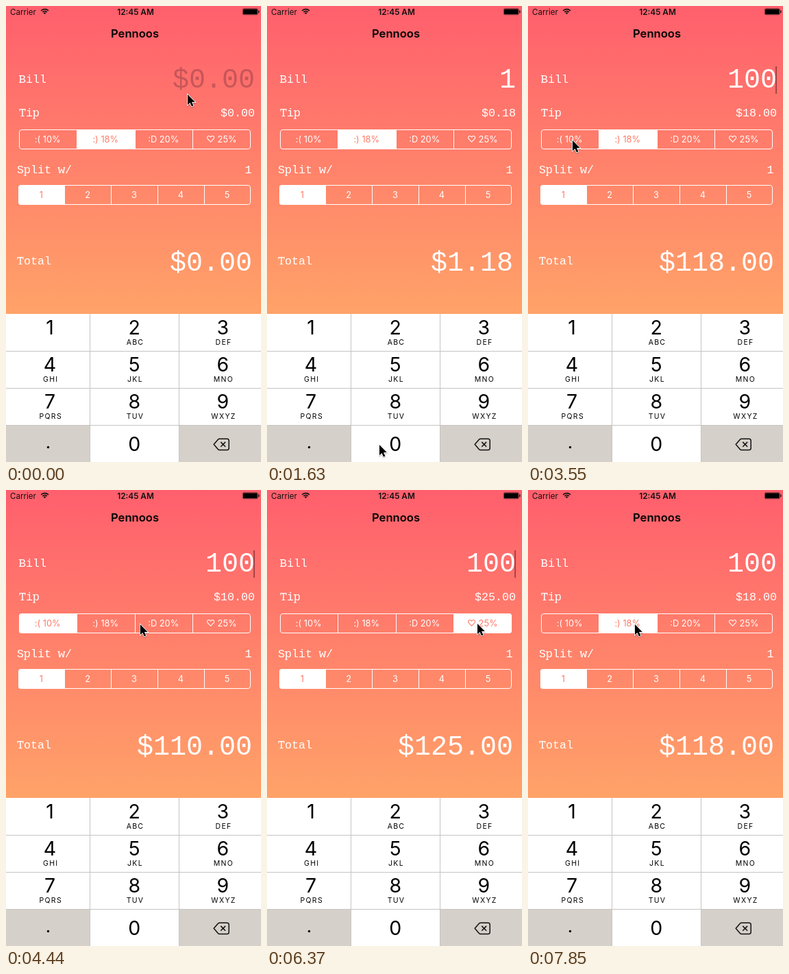
An HTML page with a canvas that plays this animation: 372x665 px, repeating every 8 s.

```html
<!DOCTYPE html>
<html lang="en">
<head>
<meta charset="utf-8">
<title>Tip calculator</title>
<style>
html, body { margin: 0; width: 100%; height: 100%; overflow: hidden; background: #ff5f6d; }
canvas { display: block; width: 372px; height: 665px; }
</style>
</head>
<body>
<canvas id="stage"></canvas>
<script>
const W = 372, H = 665, LOOP = 8000, STEP = LOOP / 54;
const SANS = 'Inter, "DejaVu Sans", sans-serif';
const MONO = '"Liberation Mono", monospace';
const TINT = '#ff7a66';
const RATES = [0.10, 0.18, 0.20, 0.25];
const RATE_LABELS = [':( 10%', ':) 18%', ':D 20%', '♡ 25%'];

// [time, value], each held until the next
const BILL = [[0, 0], [885, 1], [1775, 10], [2070, 100]];
const RATE = [[0, 1], [3545, 0], [5030, 2], [6365, 3], [7545, 1]];
// [time, x, y] of the pointer tip
const POINTER = [
  [0, 265, 129], [593, 61, 478], [1040, 61, 478], [1482, 156, 646], [1630, 164, 640],
  [2520, 164, 640], [3260, 65, 196], [3850, 65, 196], [4445, 220, 196], [4593, 236, 189],
  [4741, 239, 188], [5630, 239, 188], [6075, 307, 195], [6520, 307, 195],
  [6963, 189, 194], [7408, 156, 196], [8000, 156, 196]
];
// Slab feet as [x, y, w, h] from the start of the letter's baseline
const SLABS = {
  T: [[2.6, -1, 4.8, 1], [0.5, -10.5, 1, 3], [8.5, -10.5, 1, 3]],
  B: [[0, -1, 2, 1], [0, -11, 2, 1]],
  p: [[0, 2.7, 4, 1], [0, -8.8, 2, 1]],
  w: [[-0.4, -8.8, 3, 1], [7.4, -8.8, 3, 1]]
};

const canvas = document.getElementById('stage');
const ctx = canvas.getContext('2d');
const dpr = window.devicePixelRatio || 1;
canvas.width = W * dpr;
canvas.height = H * dpr;

const clamp = v => Math.max(0, Math.min(1, v));
const ease = v => v * v * (3 - 2 * v);
const money = v => '$' + v.toFixed(2);
const held = (keys, t) => keys.filter(k => k[0] <= t).pop()[1];

function rect(x, y, w, h, color) {
  ctx.fillStyle = color;
  ctx.fillRect(x, y, w, h);
}

function text(str, x, y, font, color, align = 'left', spacing = 0) {
  ctx.font = font;
  ctx.fillStyle = color;
  ctx.textAlign = align;
  ctx.letterSpacing = spacing + 'px';
  ctx.fillText(str, x, y);
}

function line(points, width, color) {
  ctx.beginPath();
  points.forEach(([x, y]) => ctx.lineTo(x, y));
  ctx.lineWidth = width;
  ctx.strokeStyle = color;
  ctx.stroke();
}

function label(str, x, y) {
  text(str, x, y, '16.67px ' + MONO, '#fff');
  [...str].forEach((ch, i) => (SLABS[ch] || []).forEach(
    ([dx, dy, w, h]) => rect(x + i * 10 + dx, y + dy, w, h, '#fff')));
}

function amount(str, right, y, size, color = '#fff') {
  text(str, right, y, size + 'px ' + MONO, color, 'right');
}

function statusBar() {
  text('Carrier', 6, 12.5, '11.6px ' + SANS, '#111');
  text('12:45 AM', 189, 12.5, '600 11.8px ' + SANS, '#111', 'center');
  ctx.strokeStyle = '#111';
  ctx.lineWidth = 1.6;
  for (const r of [4.4, 7.4]) {
    ctx.beginPath();
    ctx.arc(56.5, 12, r, -Math.PI * 0.76, -Math.PI * 0.24);
    ctx.stroke();
  }
  ctx.fillStyle = '#111';
  ctx.beginPath();
  ctx.moveTo(56.5, 12);
  ctx.arc(56.5, 12, 2.6, -Math.PI * 0.76, -Math.PI * 0.24);
  ctx.fill();
  ctx.strokeStyle = '#111';
  ctx.lineWidth = 0.6;
  ctx.beginPath();
  ctx.roundRect(345.3, 3.8, 22, 9, 2);
  ctx.stroke();
  ctx.fillStyle = '#000';
  ctx.beginPath();
  ctx.roundRect(346, 4.5, 20.6, 7.6, 1.2);
  ctx.fill();
  rect(368.2, 6.5, 1.3, 3.6, '#111');
}

function segments(x, y, w, h, labels, chosen) {
  const size = w / labels.length;
  ctx.save();
  ctx.beginPath();
  ctx.roundRect(x, y, w, h, 4);
  ctx.clip();
  rect(Math.round(x + chosen * size), y, Math.round(size), h, '#fff');
  labels.forEach((_, i) => {
    if (i) rect(Math.floor(x + i * size), y, 1, h, '#fff');
  });
  ctx.restore();
  ctx.strokeStyle = '#fff';
  ctx.lineWidth = 1;
  ctx.beginPath();
  ctx.roundRect(x + 0.5, y + 0.5, w - 1, h - 1, 3.5);
  ctx.stroke();
  labels.forEach((s, i) => text(s, x + (i + 0.5) * size - 0.5, y + 19,
    '12.8px ' + SANS, i === chosen ? TINT : '#fff', 'center'));
}

function keypad() {
  const letters = ['', 'ABC', 'DEF', 'GHI', 'JKL', 'MNO', 'PQRS', 'TUV', 'WXYZ'];
  const centers = [64, 187.3, 316.3];
  const digit = '28.5px ' + SANS;
  rect(0, 449, W, H - 449, '#fff');
  rect(0, 612, 122, 53, '#d5d0c9');
  rect(253, 612, 119, 53, '#d5d0c9');
  for (const y of [503, 557, 611]) rect(0, y, W, 1, '#c6c4c2');
  for (const x of [122, 252]) rect(x, 449, 1, H - 449, '#c6c4c2');
  letters.forEach((s, i) => {
    const x = centers[i % 3], y = 479 + 54 * Math.floor(i / 3);
    text(String(i + 1), x, y, digit, '#000', 'center');
    text(s, x + 1.2, y + 15, '10.5px ' + SANS, '#000', 'center', 1.3);
  });
  text('0', 187.3, 648.5, digit, '#000', 'center');
  ctx.beginPath();
  ctx.arc(61.5, 643.5, 1.7, 0, 7);
  ctx.fill();

  ctx.lineJoin = 'round';
  ctx.strokeStyle = '#111';
  ctx.lineWidth = 1.5;
  ctx.beginPath();
  ctx.moveTo(303.2, 639.3);
  ctx.lineTo(309.3, 632.2);
  ctx.quadraticCurveTo(310.2, 631.2, 311.5, 631.2);
  ctx.lineTo(322.5, 631.2);
  ctx.quadraticCurveTo(325.2, 631.2, 325.2, 634);
  ctx.lineTo(325.2, 644.7);
  ctx.quadraticCurveTo(325.2, 647.4, 322.5, 647.4);
  ctx.lineTo(311.5, 647.4);
  ctx.quadraticCurveTo(310.2, 647.4, 309.3, 646.4);
  ctx.closePath();
  ctx.stroke();
  line([[313.3, 635.9], [320.1, 642.7]], 1.5, '#111');
  line([[320.1, 635.9], [313.3, 642.7]], 1.5, '#111');
}

function pointerAt(t) {
  const i = POINTER.findIndex(k => k[0] > t);
  const [t0, x0, y0] = POINTER[i - 1], [t1, x1, y1] = POINTER[i];
  const k = ease((t - t0) / (t1 - t0));
  return [x0 + (x1 - x0) * k, y0 + (y1 - y0) * k];
}

function pointer(x, y) {
  const shape = [[0, 0], [0, 15.3], [3.5, 12], [6, 17.4], [8.4, 16.3], [6, 11.1], [10.8, 11.1]];
  ctx.save();
  ctx.translate(x, y);
  ctx.beginPath();
  shape.forEach(([px, py]) => ctx.lineTo(px, py));
  ctx.closePath();
  ctx.lineJoin = 'miter';
  ctx.lineWidth = 1.7;
  ctx.strokeStyle = '#fff';
  ctx.shadowColor = 'rgba(0,0,0,.3)';
  ctx.shadowBlur = 2 * dpr;
  ctx.shadowOffsetY = dpr;
  ctx.stroke();
  ctx.shadowColor = 'transparent';
  ctx.fillStyle = '#000';
  ctx.fill();
  ctx.restore();
}

function caretAlpha(t) {
  if (t < 1000) return clamp((t - 100) / 300);
  const p = t % 1000;
  return p > 800 ? clamp((p - 900) / 100) : clamp((620 - p) / 95);
}

function draw(t) {
  const bill = held(BILL, t), rate = held(RATE, t), tip = bill * RATES[rate];
  ctx.setTransform(dpr, 0, 0, dpr, 0, 0);
  const sky = ctx.createLinearGradient(0, 0, 0, H);
  sky.addColorStop(0, '#ff5f6d');
  sky.addColorStop(1, '#ffc366');
  rect(0, 0, W, H, sky);

  statusBar();
  text('Pennoos', 188, 46, '600 16.6px ' + SANS, '#000', 'center');

  label('Bill', 19, 112);
  if (bill) amount(String(bill), 363, 119, 40);
  else amount('$0.00', 363, 119, 40, 'rgba(0,0,25,.22)');
  rect(361.5, 88, 1, 40, `rgba(50,10,20,${0.85 * caretAlpha(t)})`);
  label('Tip', 19, 161);
  amount(money(tip), 363, 161, 16.67);
  segments(19, 180, 338, 29, RATE_LABELS, rate);

  label('Split w/', 16, 244);
  amount('1', 358.5, 244, 16.67);
  segments(18, 261, 339, 29, ['1', '2', '3', '4', '5'], 0);

  label('Total', 16, 377);
  amount(money(bill + tip), 359, 386, 40);

  keypad();
  pointer(...pointerAt(t));
}

const start = performance.now();
function frame() {
  const t = (performance.now() - start) % LOOP;
  draw(Math.floor(t / STEP + 0.02) % 54 * STEP);
  requestAnimationFrame(frame);
}
frame();
</script>
</body>
</html>
```
